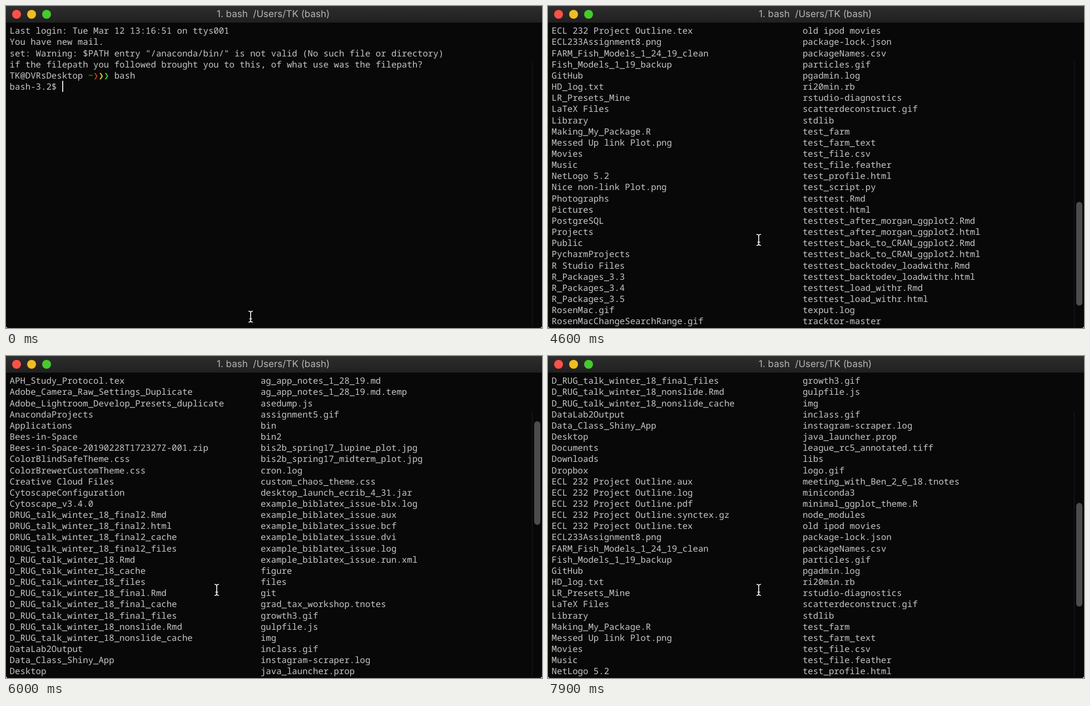
Animation of 964 by 581 pixels, one loop 8 s. Source, as an HTML page:

```html
<!DOCTYPE html>
<html lang="en">
<head>
<meta charset="utf-8">
<title>Terminal</title>
<style>
html, body { margin: 0; width: 100%; height: 100%; overflow: hidden; }
html { background: #fff; }
body { position: relative; background: #080808; border-radius: 0 0 4px 4px; text-rendering: geometricPrecision; }
body > * { position: absolute; margin: 0; }
#bar {
  left: 0; top: 0; width: 964px; height: 31px; box-sizing: border-box; padding-left: 379px;
  background: linear-gradient(#2d2d2d, #202020); border-top: 1px solid #363636; border-bottom: 1px solid #080808;
  color: #b4b4b4; font: 17px/29px Inter, Roboto, sans-serif; white-space: pre;
}
#bar i { position: absolute; top: 6px; width: 16px; height: 16px; border-radius: 50%; }
#text {
  left: 6.6px; top: 34.3px; height: 546px; color: #c6c6c6;
  font: 15.68px/20.16px "Noto Sans Mono", "DejaVu Sans Mono", monospace; font-variant-ligatures: none;
}
#text b {
  display: inline-block; width: 9.408px; height: 20.16px; vertical-align: top; text-align: center;
}
#caret { width: 2px; height: 20px; background: #d8d8d8; }
#track { left: 946px; top: 100px; width: 1px; height: 479px; background: #1b1b1b; }
#thumb { left: 950px; top: 0; width: 11px; height: 187px; border-radius: 6px; background: #4c4c4c; }
#mouse { left: 0; top: 0; overflow: visible; fill: none; }
</style>
</head>
<body>
<div id="bar"><i style="left:10.5px;background:#ff5149"></i><i style="left:37.5px;background:#efbd23"></i><i style="left:64.5px;background:#45cb2d"></i>1. bash  /Users/TK (bash)</div>
<pre id="text"></pre>
<div id="caret"></div>
<div id="track"></div>
<div id="thumb"></div>
<svg id="mouse" width="1" height="1">
  <defs><path id="beam" d="M-4-10Q0-10 0-7V7Q0 10-4 10M4-10Q0-10 0-7M4 10Q0 10 0 7M-2.5 4h5"/></defs>
  <use href="#beam" stroke="#000" stroke-width="3.4"/>
  <use href="#beam" stroke="#f2f2f2" stroke-width="1.7"/>
</svg>
<script>
const LOOP = 8000, ROW = 20.16, CHAR = 9.408, LEFT = 6.6, TOP = 34.3, VISIBLE = 27;
const $ = id => document.getElementById(id);
const withExt = (base, exts) => exts.split(" ").map(e => base + e);
const list = s => s.trim().split("\n");

const leftFiles = [
  ...withExt("APH_Study_Protocol", "-blx.bib .aux .log .pdf .run.xml .synctex.gz .tex"),
  ...list(`
Adobe_Camera_Raw_Settings_Duplicate
Adobe_Lightroom_Develop_Presets_duplicate
AnacondaProjects
Applications
Bees-in-Space
Bees-in-Space-20190228T172327Z-001.zip
ColorBlindSafeTheme.css
ColorBrewerCustomTheme.css
Creative Cloud Files
CytoscapeConfiguration
Cytoscape_v3.4.0`),
  ...withExt("DRUG_talk_winter_18_final2", ".Rmd .html _cache _files"),
  ...withExt("D_RUG_talk_winter_18",
    ".Rmd _cache _files _final.Rmd _final_cache _final_files _nonslide.Rmd _nonslide_cache"),
  ...list(`
DataLab2Output
Data_Class_Shiny_App
Desktop
Documents
Downloads
Dropbox`),
  ...withExt("ECL 232 Project Outline", ".aux .log .pdf .synctex.gz .tex"),
  ...list(`
ECL233Assignment8.png
FARM_Fish_Models_1_24_19_clean
Fish_Models_1_19_backup
GitHub
HD_log.txt
LR_Presets_Mine
LaTeX Files
Library
Making_My_Package.R
Messed Up link Plot.png
Movies
Music
NetLogo 5.2
Nice non-link Plot.png
Photographs
Pictures
PostgreSQL
Projects
Public
PycharmProjects
R Studio Files
R_Packages_3.3
R_Packages_3.4
R_Packages_3.5
RosenMac.gif
RosenMacChangeSearchRange.gif
SQL_Notes.txt
Scratch
Scripts
Shiny_Apps
Simulations`)
];

const rightFiles = [
  ...list(`
Sites
TA_Orientation_Step_3.tnotes
TESTEST
Zotero
Zotero_Library.bib
ace_theme_test_script.R
ag_app_notes_1_28_19.md
ag_app_notes_1_28_19.md.temp
asedump.js
assignment5.gif
bin
bin2
bis2b_spring17_lupine_plot.jpg
bis2b_spring17_midterm_plot.jpg
cron.log
custom_chaos_theme.css
desktop_launch_ecrib_4_31.jar`),
  ...withExt("example_biblatex_issue", "-blx.log .aux .bcf .dvi .log .run.xml"),
  ...list(`
figure
files
git
grad_tax_workshop.tnotes
growth3.gif
gulpfile.js
img
inclass.gif
instagram-scraper.log
java_launcher.prop
league_rc5_annotated.tiff
libs
logo.gif
meeting_with_Ben_2_6_18.tnotes
miniconda3
minimal_ggplot_theme.R
node_modules
old ipod movies
package-lock.json
packageNames.csv
particles.gif
pgadmin.log
ri20min.rb
rstudio-diagnostics
scatterdeconstruct.gif
stdlib
test_farm
test_farm_text
test_file.csv
test_file.feather
test_profile.html
test_script.py`),
  ...withExt("testtest", ".Rmd .html _after_morgan_ggplot2.Rmd _after_morgan_ggplot2.html"),
  ...withExt("testtest_back", "_to_CRAN_ggplot2.Rmd _to_CRAN_ggplot2.html todev_loadwithr.Rmd todev_loadwithr.html"),
  ...withExt("testtest_load_withr", ".Rmd .html"),
  ...list(`
texput.log
tracktor-master
untitled.gif
vignette.Rmd
webpage.html
wiki_notes.md
workshop.csv`)
];

const arrow = color => `<b style="color:${color}">❯</b>`;
const prompt = "bash-3.2$ ";
const intro = [
  "Last login: Tue Mar 12 13:16:51 on ttys001",
  "You have new mail.",
  'set: Warning: $PATH entry "/anaconda/bin/" is not valid (No such file or directory)',
  "if the filepath you followed brought you to this, of what use was the filepath?",
  `TK@DVRsDesktop <span style="color:#35b82a">~</span>${arrow("#c03a2b")}${arrow("#e3c62f")}${arrow("#3fc832")} bash`
];
const listing = [
  ...intro, prompt + "ls",
  ...leftFiles.map((name, i) => name.padEnd(48) + rightFiles[i]),
  prompt
];
const lastTop = listing.length - VISIBLE;

// time, first visible row
const scroll = [[3500, lastTop], [4600, 46.05], [5500, 28.05], [6000, 12.05], [6400, 3], [6800, 5.6], [7900, 33.3]];

function track(keys, t) {
  if (t <= keys[0][0]) return keys[0][1];
  const i = keys.findIndex(k => k[0] >= t);
  if (i < 0) return keys.at(-1)[1];
  const [t0, a] = keys[i - 1], [t1, b] = keys[i];
  return a + (b - a) * (t - t0) / (t1 - t0);
}

function caretAlpha(t) {
  if (t < 600 || t >= 2900) return 1;
  const phase = (t - 600) % 1000, fade = phase % 500 < 100 ? 0.5 : 1;
  return phase < 500 ? 1 - fade : fade;
}

let shown;
function draw(now) {
  const t = Math.floor(now % LOOP / 100) * 100;
  const listed = t >= 2900, scrolling = t >= 3500;
  const typed = "ls".slice(0, t < 200 ? 0 : t < 400 ? 1 : 2);
  const top = listed ? track(scroll, t) : 0, first = Math.floor(top);
  const rows = listed ? listing.slice(first, first + VISIBLE) : [...intro, prompt + typed];
  const html = rows.join("\n");
  if (html !== shown) $("text").innerHTML = shown = html;

  const row = listed ? listing.length - 1 - first : 5;
  const col = prompt.length + (listed ? 0 : typed.length);
  const caret = $("caret").style;
  caret.left = Math.round(LEFT + col * CHAR) + "px";
  caret.top = Math.round(TOP + row * ROW) + "px";
  caret.opacity = row < VISIBLE ? caretAlpha(t) : 0;

  const thumb = $("thumb").style;
  thumb.opacity = scrolling ? 1 : 0;
  thumb.transform = `translateY(${34 + 6.94 * top}px)`;

  const move = Math.min(1, Math.max(0, (t - 3000) / 500));
  const mouse = $("mouse").style;
  mouse.opacity = t < 200 || t >= 3000 ? 1 : 0;
  mouse.transform = `translate(${440 - 61 * move}px, ${560.5 - 138.5 * move}px)`;
}

const start = performance.now();
(function tick() {
  draw(performance.now() - start);
  requestAnimationFrame(tick);
})();
</script>
</body>
</html>
```
